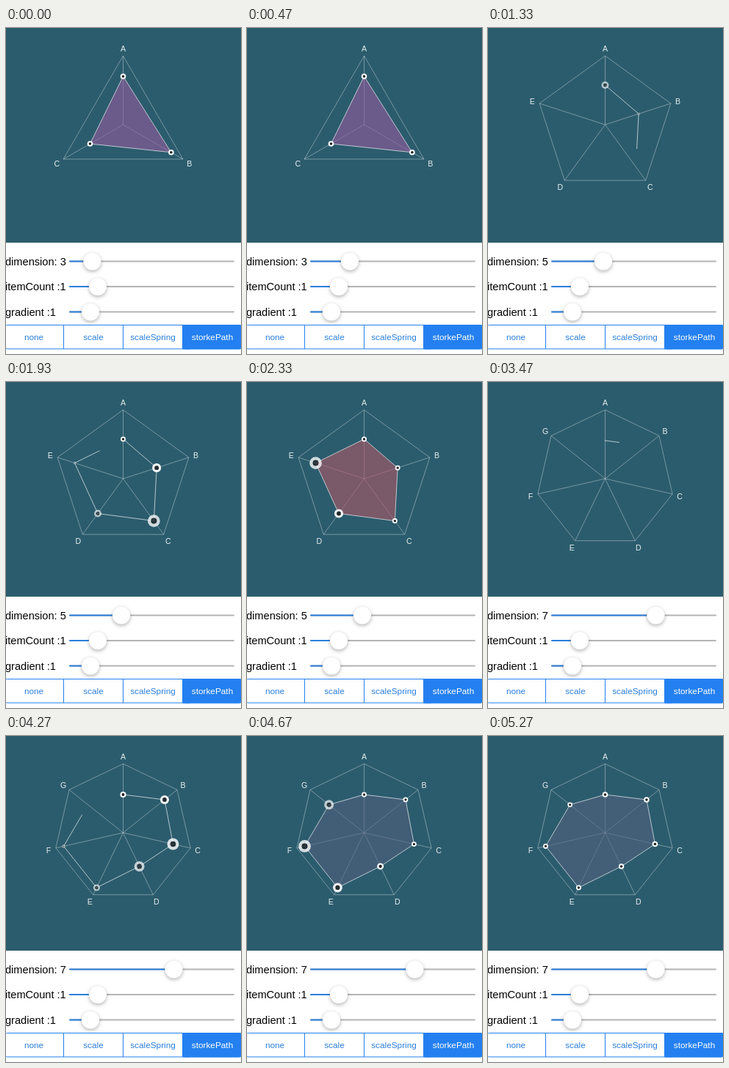
Write an HTML page that moves like this. It is 320 by 445 pixels and loops after 5340 ms.

```html
<!DOCTYPE html>
<html lang="en">
<head>
<meta charset="utf-8">
<title>Radar chart</title>
<style>
  html, body { margin: 0; width: 100%; height: 100%; overflow: hidden; background: #2b5c6d; }
  svg { display: block; width: 100vw; height: 100vh; }
  text { font-family: "Liberation Sans", Arial, sans-serif; }
  .label { font-size: 14.6px; fill: #000; }
  .tab { font-size: 11.8px; fill: #2b7fdc; text-anchor: middle; }
  .axis { font-size: 10.6px; fill: #e6eef0; text-anchor: middle; }
  .web { fill: none; stroke: #fff; stroke-opacity: .45; stroke-width: .8; }
  .line { fill: none; stroke: #fff; stroke-opacity: .72; stroke-width: .9; }
  .thumb { fill: #fff; stroke: #000; stroke-opacity: .08; stroke-width: .6;
           filter: drop-shadow(0 2px 2.5px rgba(0, 0, 0, .28)); }
</style>
</head>
<body>
<svg viewBox="0 0 320 445">
  <rect width="320" height="445" fill="#2b5c6d"/>
  <g id="chart"></g>
  <rect y="293" width="320" height="152" fill="#fff"/>
  <g id="controls"></g>
</svg>
<script>
const LOOP = 5340, CX = 159.5, CY = 132, RADIUS = 94;

// start: when the chart is reloaded; radii: one value per axis
const charts = [
  { start: -3000, color: '#945a9f', radii: [66, 75.5, 52] },
  { start: 1030, color: '#b05868', radii: [54, 48, 71.2, 58.7, 69.4] },
  { start: 3425, color: '#53617f', radii: [52, 72.2, 69.7, 51, 83.2, 83.1, 61.2] }
];
const thumbKeys = [[60, 117.5], [470, 140], [840, 157], [2450, 157], [3260, 228.5]];
const dotKeys = [[0, 0], [515, 8.6], [890, 3.5], [1000, 3.3], [1300, 3.5], [1500, 3.8]];

const chartBox = document.getElementById('chart');
const controls = document.getElementById('controls');

function add(parent, tag, attrs, text) {
  const el = document.createElementNS('http://www.w3.org/2000/svg', tag);
  for (const key in attrs) el.setAttribute(key, attrs[key]);
  if (text !== undefined) el.textContent = text;
  parent.appendChild(el);
  return el;
}

const clamp = v => Math.max(0, Math.min(1, v));

function follow(keys, t) {
  if (t <= keys[0][0]) return keys[0][1];
  for (let i = 1; i < keys.length; i++) {
    const [t0, a] = keys[i - 1], [t1, b] = keys[i];
    if (t < t1) return a + (b - a) * (t - t0) / (t1 - t0);
  }
  return keys[keys.length - 1][1];
}

function polar(i, n, r) {
  const a = i / n * 2 * Math.PI;
  return [CX + r * Math.sin(a), CY - r * Math.cos(a)];
}

const closed = pts => 'M' + pts.map(p => p.join()).join('L') + 'Z';

function buildChart(chart) {
  const n = chart.radii.length;
  const rim = chart.radii.map((_, i) => polar(i, n, RADIUS));
  const pts = chart.radii.map((r, i) => polar(i, n, r));
  const spokes = rim.map(p => `M${CX},${CY}L${p.join()}`).join('');
  chart.group = add(chartBox, 'g', {});
  add(chart.group, 'path', { class: 'web', d: closed(rim) + spokes });
  rim.forEach((_, i) => {
    const [x, y] = polar(i, n, 104.2);
    add(chart.group, 'text', { class: 'axis', x, y: y + 4.4 }, String.fromCharCode(65 + i));
  });
  chart.area = add(chart.group, 'path', { d: closed(pts), fill: chart.color });
  chart.line = add(chart.group, 'path', { class: 'line', d: closed(pts) });
  chart.length = chart.line.getTotalLength();
  chart.dots = pts.map(([x, y]) => {
    const g = add(chart.group, 'g', { transform: `translate(${x} ${y})` });
    return { g, ring: add(g, 'circle', { fill: '#fff' }), core: add(g, 'circle', { fill: '#1d2326' }) };
  });
}

function drawChart(chart, t) {
  const age = t - chart.start, n = chart.dots.length;
  const done = clamp(age / 1000);
  chart.line.setAttribute('stroke-dasharray',
    done < 1 ? `${done * chart.length} ${chart.length + 10}` : 'none');
  chart.area.setAttribute('fill-opacity', .6 * clamp((age - 1000) / 250));
  chart.dots.forEach((dot, i) => {
    const local = age - i / n * 1000;
    const r = follow(dotKeys, local);
    dot.ring.setAttribute('r', r);
    dot.core.setAttribute('r', r * .48);
    dot.g.setAttribute('opacity', local > 0 ? clamp(.4 + .00075 * local) : 0);
  });
}

function slider(y, x, text) {
  const label = add(controls, 'text', { class: 'label', x: -1, y: y + 5.3 }, text);
  add(controls, 'rect', { x: 86, y: y - 1, width: 225, height: 2, rx: 1, fill: '#b4b4b6' });
  const bar = add(controls, 'rect', { x: 86, y: y - 1, height: 2, rx: 1, fill: '#2b7fdc' });
  const thumb = add(controls, 'circle', { class: 'thumb', cy: y, r: 12.2 });
  const move = v => {
    bar.setAttribute('width', v - 86);
    thumb.setAttribute('cx', v);
  };
  move(x);
  return { label, move };
}

function buildTabs() {
  const blue = '#2480f0', left = -2.5, w = 81;
  add(controls, 'rect', { x: left + 3 * w, y: 405, width: w, height: 33.5, rx: 4, fill: blue });
  add(controls, 'rect', { x: left + 3 * w, y: 405, width: 10, height: 33.5, fill: blue });
  add(controls, 'rect', { x: left, y: 405.5, width: 4 * w, height: 32.5, rx: 4, fill: 'none', stroke: blue });
  ['none', 'scale', 'scaleSpring', 'storkePath'].forEach((name, i) => {
    const x = left + i * w;
    if (i) add(controls, 'path', { d: `M${x},405V438`, stroke: blue });
    const tab = add(controls, 'text', { class: 'tab', x: x + w / 2, y: 426 }, name);
    if (i === 3) tab.style.fill = '#fff';
  });
}

charts.forEach(buildChart);
const dimension = slider(318.5, 117.5, 'dimension: 3');
slider(353, 125, 'itemCount :1');
slider(387.5, 115, 'gradient :1');
buildTabs();

function render(t) {
  const current = charts.filter(c => t >= c.start).pop();
  charts.forEach(c => c.group.setAttribute('display', c === current ? 'inline' : 'none'));
  drawChart(current, t);
  dimension.label.textContent = 'dimension: ' + current.radii.length;
  dimension.move(follow(thumbKeys, t));
}

const begin = performance.now();
function tick() {
  render((performance.now() - begin) % LOOP);
  requestAnimationFrame(tick);
}
tick();
</script>
</body>
</html>
```
